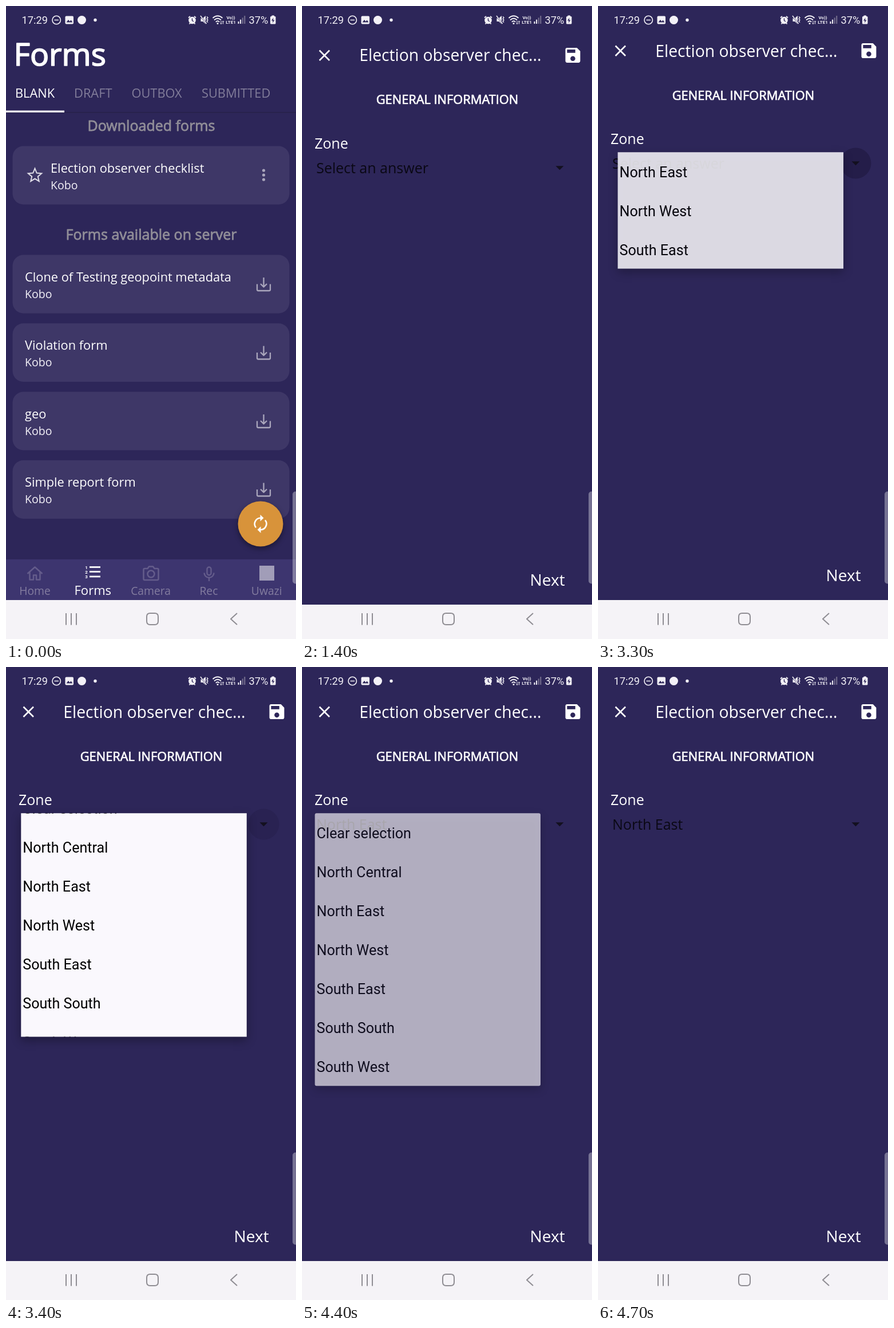
An HTML page with a canvas that plays this animation: 507 px wide and 1105 px high, repeating every 5200 ms.

```html
<!DOCTYPE html>
<html lang="en">
<head>
<meta charset="utf-8">
<title>Forms app</title>
<style>
html, body { margin: 0; width: 100%; height: 100%; overflow: hidden; background: #2d2659; }
canvas { display: block; width: 507px; height: 1105px; }
</style>
</head>
<body>
<canvas id="stage"></canvas>
<script>
const W = 507, H = 1105, LOOP = 5200, NAV_TOP = 1037;
const BG = [45, 38, 89], PAPER = '#faf8fd', DIM = '#645c8b', SOFT = '#aaa6bc';
const BG_CSS = `rgb(${BG})`;
const SANS = '"Open Sans", sans-serif', ROBOTO = 'Roboto, sans-serif';
const ZONES = ['Clear selection', 'North Central', 'North East', 'North West',
  'South East', 'South South', 'South West'];
const SAVE = new Path2D('M17 3H5c-1.1 0-2 .9-2 2v14c0 1.1.9 2 2 2h14c1.1 0 2-.9 2-2V7l-4-4z' +
  'm-5 16c-1.66 0-3-1.34-3-3s1.34-3 3-3 3 1.34 3 3-1.34 3-3 3zm3-10H5V5h10v4z');

const canvas = document.getElementById('stage');
const ratio = window.devicePixelRatio || 1;
canvas.width = W * ratio;
canvas.height = H * ratio;
const c = canvas.getContext('2d');

function text(str, x, y, size, color, { font = SANS, align = 'left', bold = 0, weight = 400 } = {}) {
  c.font = `${weight} ${size}px ${font}`;
  c.textAlign = align;
  c.fillStyle = color;
  c.fillText(str, x, y);
  if (bold) {
    c.strokeStyle = color;
    c.lineWidth = bold;
    c.lineJoin = 'round';
    c.strokeText(str, x, y);
  }
}

function box(x, y, w, h, color, r = 0) {
  c.fillStyle = color;
  c.beginPath();
  c.roundRect(x, y, w, h, r);
  c.fill();
}

function disc(x, y, r, color) {
  c.fillStyle = color;
  c.beginPath();
  c.arc(x, y, r, 0, Math.PI * 2);
  c.fill();
}

function line(d, color, width, cap = 'butt') {
  c.strokeStyle = color;
  c.lineWidth = width;
  c.lineCap = cap;
  c.lineJoin = 'round';
  c.stroke(new Path2D(d));
}

function fill(d, color) {
  c.fillStyle = color;
  c.fill(new Path2D(d));
}

function at(x, y, draw) {
  c.save();
  c.translate(x, y);
  draw();
  c.restore();
}

function statusBar() {
  const ink = '#f3f1f7';
  text('17:29', 27.5, 30.5, 18.3, ink, { font: ROBOTO });
  line('M81 24.5a7.2 7.2 0 1 0 14.4 0a7.2 7.2 0 1 0 -14.4 0M84.500 24.5h7.400', ink, 1.6);
  box(103.500, 17.5, 14.5, 14, ink, 2);
  fill('M105.500 28.500l3.500-4.500 2.500 3 2-2.500 3 4z', BG_CSS);
  disc(132.5, 24.5, 7.5, ink);
  disc(156, 24.5, 2.7, ink);

  // Alarm
  disc(325.500, 25, 6.3, ink);
  line('M319 20.500l3-2.700M332 20.500l-3-2.700M320.500 31.500l1.500-2M330.500 31.500l-1.500-2', ink, 1.800);
  line('M325.500 21.500v4l2.500 1.500', BG_CSS, 1.400);

  // Muted speaker
  fill('M340.500 21.500h3.500l5-4.500v14.500l-5-4.500h-3.500z', ink);
  line('M340 17l10.500 14', BG_CSS, 2.600);
  line('M340 17l10.500 14M351 18.500l2 2-2 2 2 2-2 2 2 2', ink, 1.500);

  // Wi-Fi
  line('M361.500 21q8.500-7.500 17 0M364 24.500q6-5.500 12 0M366.800 27.800q3.200-3 6.400 0', ink, 1.800);
  disc(370, 30.500, 1.5, ink);
  line('M376 26v5.500M374.500 30l1.500 1.500 1.500-1.500M379.500 31.500v-5.500M378 27.500l1.500-1.500 1.500 1.500', ink, 1);

  text('Vo))', 393, 22.5, 8, ink, { font: ROBOTO, align: 'center', weight: 700 });
  text('LTE1', 393, 31.200, 8, ink, { font: ROBOTO, align: 'center', weight: 700 });
  for (let i = 0; i < 4; i++) {
    const h = 4 + i * 3.3;
    box(405.500 + i * 3.6, 31 - h, 2, h, i < 2 ? ink : '#77718f');
  }
  text('37%', 424.5, 30.5, 18.3, ink, { font: ROBOTO });
  box(464.500, 16.500, 4.500, 3, ink);
  box(462, 18, 9.500, 13.500, ink, 1.500);
  fill('M467.500 20.500l-3.500 5h2.500l-.5 4 3.500-5h-2.500z', BG_CSS);
}

function star(x, y, r) {
  c.beginPath();
  for (let i = 0; i < 10; i++) {
    const a = i * Math.PI / 5 - Math.PI / 2, d = i % 2 ? r * 0.45 : r;
    c.lineTo(x + d * Math.cos(a), y + d * Math.sin(a));
  }
  c.closePath();
  c.strokeStyle = '#dedce6';
  c.lineWidth = 2;
  c.lineJoin = 'miter';
  c.stroke();
}

function card(y, title, x) {
  box(11.5, y, 484, 102, '#3e3767', 19);
  text(title, x, y + 46, 21.8, '#fff');
  text('Kobo', x, y + 75, 19.5, '#f4f2f8');
}

function download(y) {
  at(450.5, y, () => line(
    'M-11.500-1v9.500q0 2 2 2h19q2 0 2-2v-9.500M0-12.500v16M-5.500-1.500l5.500 5.500 5.500-5.500', SOFT, 2.300));
}

function refreshButton() {
  c.save();
  c.shadowColor = 'rgba(0,0,0,.4)';
  c.shadowBlur = 10 * ratio;
  c.shadowOffsetY = 4 * ratio;
  disc(445, 904, 39.5, '#d8933a');
  c.restore();
  for (const turn of [0, Math.PI]) {
    at(445, 904, () => {
      c.rotate(turn);
      line('M-8 6.500A10.300 10.300 0 0 1 0 -10.300', '#fff', 2.600);
      fill('M-.5-16v11.500l6-5.700z', '#fff');
    });
  }
}

function tabBar() {
  box(0, 966, W, 71, '#3d356f');
  const label = '#837c9f';
  line('M37.500 991l13-11.500 13 11.500M41.500 988.500v13h6.500v-8h5v8h6.500v-13', DIM, 2.500);
  [979.5, 987.5, 996].forEach((y, i) => {
    box(146, y - 1.400, 19, 2.8, '#fff');
    text(String(i + 1), 140.5, y + 3, 8, '#fff', { font: ROBOTO, align: 'center', weight: 700 });
  });
  line('M242.500 982h5l2.500-3.500h7l2.500 3.500h5q2 0 2 2v16q0 2-2 2h-22q-2 0-2-2v-16q0-2 2-2z' +
    'M247.500 991.500a6 6 0 1 0 12 0a6 6 0 1 0 -12 0', DIM, 2.500);
  line('M351.500 983a3.500 3.500 0 0 1 7 0v7a3.500 3.500 0 0 1-7 0z' +
    'M346.500 989.500a8.500 8.500 0 0 0 17 0M355 998v6', DIM, 2.400);
  box(443, 977, 26, 26, '#a19db8');
  const names = ['Home', 'Forms', 'Camera', 'Rec', 'Uwazi'];
  names.forEach((name, i) => {
    const active = i === 1;
    text(name, 50.5 + i * 101.3, active ? 1027.500 : 1027.5, active ? 22 : 19.3,
      active ? '#fff' : label, { align: 'center' });
  });
}

function formList() {
  box(0, 0, W, NAV_TOP, BG_CSS);
  text('Forms', 13.5, 104, 55, '#fff', { bold: 1.7 });
  const tabs = [['BLANK', 16], ['DRAFT', 119], ['OUTBOX', 219.5], ['SUBMITTED', 342]];
  tabs.forEach(([name, x], i) => text(name, x, 160.3, 21.8, i ? '#827d9a' : '#fff'));
  box(0, 185, W, 1.5, '#272049');
  box(0, 182.5, 102, 3.2, '#fff');

  const heading = { align: 'center', bold: 0.8 };
  text('Downloaded forms', 254, 217.500, 25, '#918e98', heading);
  card(244.500, 'Election observer checklist', 78);
  star(50.5, 296, 12.3);
  for (const dy of [-8, 0, 8]) disc(450.5, 295 + dy, 2.6, SOFT);

  text('Forms available on server', 254, 407.5, 25, '#918e98', heading);
  ['Clone of Testing geopoint metadata', 'Violation form', 'geo', 'Simple report form']
    .forEach((title, i) => {
      const y = 434.5 + i * 119.5;
      card(y, title, 33);
      download(y + 52);
    });
  tabBar();
  refreshButton();
}

function formPage(answer, ripple) {
  box(0, 0, W, NAV_TOP, BG_CSS);
  line('M30.500 69.500l17.500 17.500M48 69.500l-17.500 17.500', '#fff', 2.600);
  text('Election observer chec...', 100.3, 88.500, 28.3, '#fff');
  at(456.2, 60.800, () => {
    c.scale(1.44, 1.44);
    c.fillStyle = '#fff';
    c.fill(SAVE);
  });
  text('GENERAL INFORMATION', 254, 163.5, 21.8, '#fff', { align: 'center', bold: 0.7 });
  text('Zone', 22, 241, 25, '#fff');
  if (ripple) disc(450.5, 274.5, 27, `rgba(20,14,45,${0.36 * ripple})`);
  text(answer, 25, 284, 25, '#0a0814');
  fill('M443.500 271.300h14l-7 7z', '#13101f');
  text('Next', 398.5, 1004, 28.2, '#fff');
}

// The list unrolls from its middle row while sliding to its final place.
function popup(open, alpha) {
  const full = 476, h = full * open, x = 22.5 + 21 * (1 - open), y = 255.3;
  const shift = (full - h) / 2;
  c.save();
  c.globalAlpha = alpha;
  c.shadowColor = 'rgba(0,0,0,.32)';
  c.shadowBlur = 16 * ratio;
  c.shadowOffsetY = 6 * ratio;
  box(x, y, 394.5, h, PAPER, open < 1 ? 0 : 3);
  c.restore();

  c.save();
  c.beginPath();
  c.rect(x, y, 394.5, h);
  c.clip();
  const ink = `rgb(${BG.map(v => Math.round(v * (1 - alpha)))})`;
  ZONES.forEach((name, i) =>
    text(name, x + 3, 299 + i * 68 - shift, 25.1, ink, { font: ROBOTO }));
  c.restore();
}

function navIcons(covered) {
  const d = 'M105 1060v20.500M114 1060v20.500M123 1060v20.500' +
    'M252 1060h8q6 0 6 6v8q0 6-6 6h-8q-6 0-6-6v-8q0-6 6-6zM404 1060l-11 10 11 10';
  line(d, covered ? '#77738c' : '#8f8d93', covered ? 3.6 : 2);
  if (covered) line(d, '#262042', 1.8);
}

function draw(t) {
  c.setTransform(ratio, 0, 0, ratio, 0, 0);
  const step = from => Math.floor((t - from) / 100);
  const listShown = t < 1200;
  const slide = listShown || t >= 1600 ? 0 : 65 * 0.35 ** step(1200);

  box(0, 0, W, H, BG_CSS);
  box(0, NAV_TOP, W, H - NAV_TOP, '#f5f3f7');
  if (listShown) formList();
  else {
    if (slide) at(0, -24.5, formList);
    const ripple = t >= 3300 && t < 3600 ? [1, 0.45, 0.15][step(3300)] : 0;
    const covered = slide > 30;
    at(0, slide, () => formPage(t < 4400 ? 'Select an answer' : 'North East', ripple));
    if (covered) navIcons(true);
  }
  if (slide <= 30) navIcons(false);

  if (t >= 3300 && t < 4400) {
    const k = Math.min(step(3300), 3);
    popup([0.427, 0.82, 0.96, 1][k], k ? 1 : 0.86);
  } else if (t >= 4400 && t < 4700) {
    popup(1, [0.66, 0.24, 0.04][step(4400)]);
  }

  statusBar();
  box(501, 847.5, 12, 161, 'rgba(255,255,255,.35)', 5);
}

const start = performance.now();
function tick() {
  draw((performance.now() - start) % LOOP);
  requestAnimationFrame(tick);
}
tick();
</script>
</body>
</html>
```
